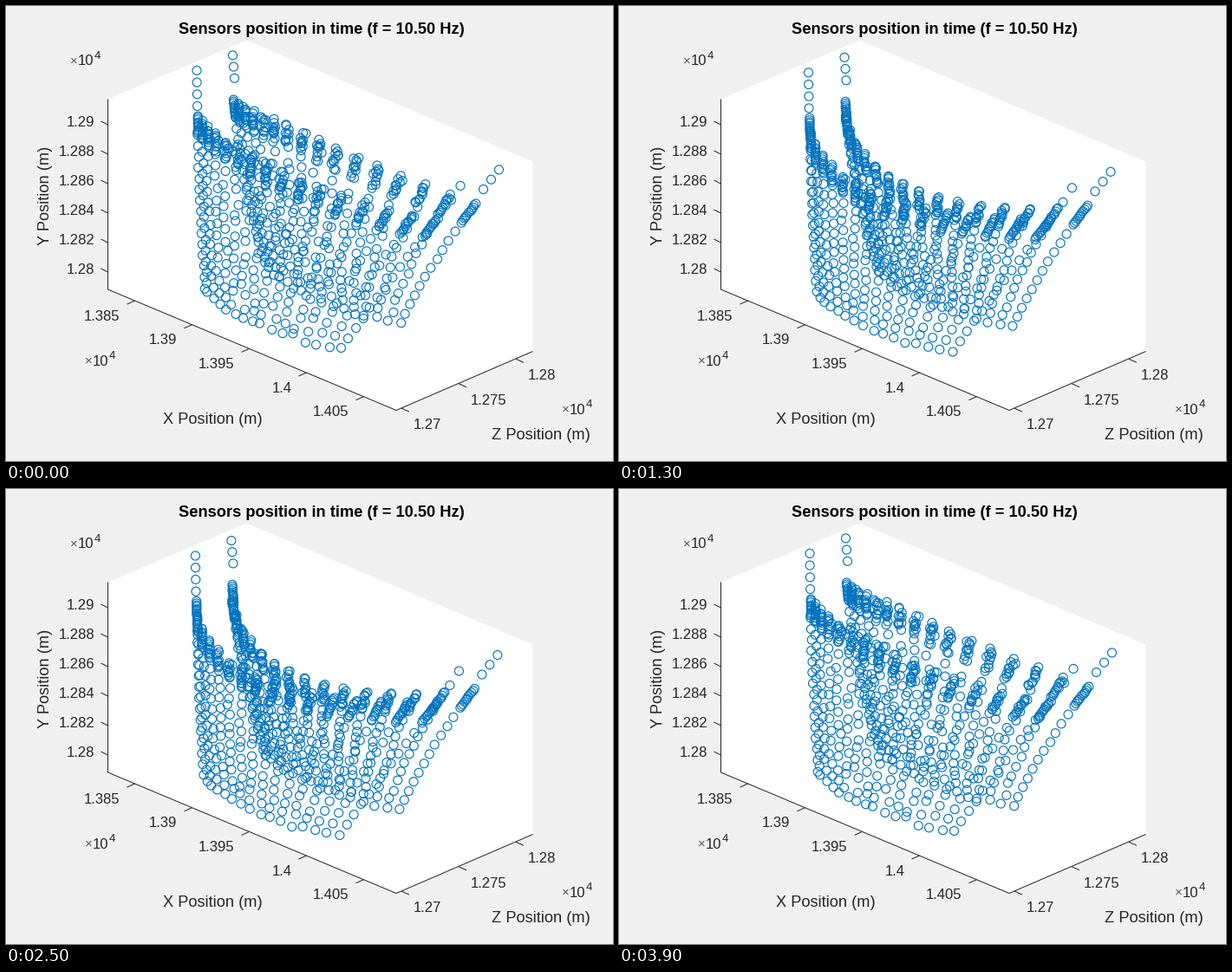
A matplotlib script that plays this animation: 700x525 px, repeating every 4 s.

```python
import numpy as np
import matplotlib.pyplot as plt
from matplotlib.animation import FuncAnimation
from matplotlib.patches import Polygon

W, H, DPI = 700, 525, 100
FRAMES, STEP_MS = 40, 100
PT = 72 / DPI  # points per pixel
INK, BLUE = "#262626", "#0072BD"
TICK_SIZE, LABEL_SIZE = 16.67, 18.3

plt.rcParams["font.family"] = "Liberation Sans"
fig = plt.figure(figsize=(W / DPI, H / DPI), dpi=DPI, facecolor="#f0f0f0")
ax = fig.add_axes([0, 0, 1, 1])
ax.set_xlim(-0.5, W - 0.5)
ax.set_ylim(H - 0.5, -0.5)
ax.axis("off")


def label(x, y, s, size=TICK_SIZE, ha="left", color=INK, **kw):
    """Text centred on y by its capital height."""
    ax.text(x, y + 0.36 * size, s, fontsize=size * PT, ha=ha, va="baseline",
            color=color, **kw)


def line(xs, ys):
    ax.plot(xs, ys, color=INK, lw=PT, solid_capstyle="butt", zorder=2)


def exponent(x, y):
    label(x, y, "×", 15, color="#555555")
    label(x + 9, y, "10")
    label(x + 28, y - 6, "4", 13.3)


def ticks(count, start, step, value, gap, mark, shift, ha):
    """Evenly spaced tick marks, each with its number beside it."""
    for k in range(count):
        x, y = start[0] + step[0] * k, start[1] + step[1] * k
        line([x, x + mark[0]], [y, y + mark[1]])
        label(x + shift[0], y + shift[1], f"{value + gap * k:.4g}", ha=ha)


def draw_axes():
    box = [(117, 107), (277, 39), (607, 179), (607, 398), (450, 466), (117, 327)]
    ax.add_patch(Polygon(box, closed=True, fc="white", ec="none", zorder=1))
    line([117, 117, 449.5, 607], [107, 326.5, 466, 398])

    ticks(6, (117, 306.5), (0, -34), 1.28, 0.002, (-8, -4), (-15, -4.5), "right")
    ticks(5, (148, 339.6), (66, 27.65), 1.385, 0.005, (-9, 4), (-17, 16.5), "right")
    ticks(3, (455.5, 463.6), (66, -28.4), 1.27, 0.005, (9, 4), (14, 18), "left")

    exponent(73, 61.5)
    exponent(90, 408)
    exponent(640, 464)
    label(237.5, 475, "X Position (m)", LABEL_SIZE, "center")
    label(616, 492.5, "Z Position (m)", LABEL_SIZE, "center")
    ax.text(50, 218.5, "Y Position (m)", fontsize=LABEL_SIZE * PT, color=INK,
            rotation=90, rotation_mode="anchor", ha="center", va="baseline")
    label(363, 24.5, "Sensors position in time (f = 10.50 Hz)", LABEL_SIZE,
          "center", "black", weight="bold")


# Two curved faces of strings, each hanging from a rim down to a base.
U = np.linspace(0, 1, 16)
SWAY = np.clip(np.sin(np.pi * U), 0, 1)
SKEWED_SWAY = np.clip(np.sin(np.pi * U ** 0.75), 0, 1) ** 1.3


def arc(start, end, px, py):
    """Curve that falls steeply at first and then runs out sideways."""
    x = start[0] + (end[0] - start[0]) * U ** px
    y = start[1] + (end[1] - start[1]) * (1 - (1 - U) ** py)
    return np.column_stack([x, y])


def face(rim, base, lift, drift, bulge, rng):
    """Rest points and swing vectors of one face."""
    rest, swing = [], []
    for i, u in enumerate(U):
        (x0, y0), (x1, y1) = rim[i], base[i]
        depth = y1 - y0
        n = round(14 - 3 * u)
        dy = np.concatenate([np.linspace(-11, 11, 11),
                             11 + (depth - 11) * np.arange(1, n + 1) / n])
        s = dy / depth
        low = np.clip(s, 0, 1)
        x = x0 + (x1 - x0) * s + bulge * s * (1 - s)
        fade = (1 - low) ** 1.3
        side = 1 + drift * SWAY[i] ** 0.6 * fade
        rise = -(lift[i] * fade + 1.5 + 1.5 * low)
        noise = (0.4 + 1.7 * SWAY[i]) * rng.normal(size=(s.size, 2))
        rest.append(np.column_stack([x, y0 + dy]))
        swing.append(np.column_stack([side, rise]) + noise)
    return np.vstack(rest), np.vstack(swing)


def anchors(start, step, count):
    """Widely spaced points above the end of a rim."""
    rest = np.array(start) + np.outer(np.arange(count), step)
    return rest, np.tile([1.0, -1.6], (count, 1))


def build_sensors():
    rng = np.random.default_rng(7)
    front = arc((220, 139), (488, 257), 1.72, 1.6)
    back = arc((262, 120), (532, 240), 1.78, 1.6)
    base = arc((228, 328), (385, 397), 1.4, 1.3)
    parts = [
        face(front, base, 20 * SKEWED_SWAY, 6, -5, rng),
        face(back, base + [69, -29.5], 38.5 * SWAY, 8, -18, rng),
        anchors((218.5, 75.5), (0.2, 13.7), 4),
        anchors((260, 58), (1, 13.2), 3),
        anchors((567, 190), (-9, 11.3), 3),
        anchors((522.5, 208.5), (-10.5, 16.5), 2),
    ]
    return [np.vstack(group) for group in zip(*parts)]


draw_axes()
REST, SWING = build_sensors()
dots = ax.scatter(*REST.T, s=(10 * PT) ** 2, facecolors="none",
                  edgecolors=BLUE, linewidths=1.15 * PT, zorder=3)


def update(k):
    # The loop opens and closes on the same pose.
    dots.set_offsets(REST + SWING * np.cos(2 * np.pi * k / (FRAMES - 1)))
    return (dots,)


anim = FuncAnimation(fig, update, frames=FRAMES, interval=STEP_MS,
                     repeat=True, repeat_delay=0, blit=False)
plt.show()
```
